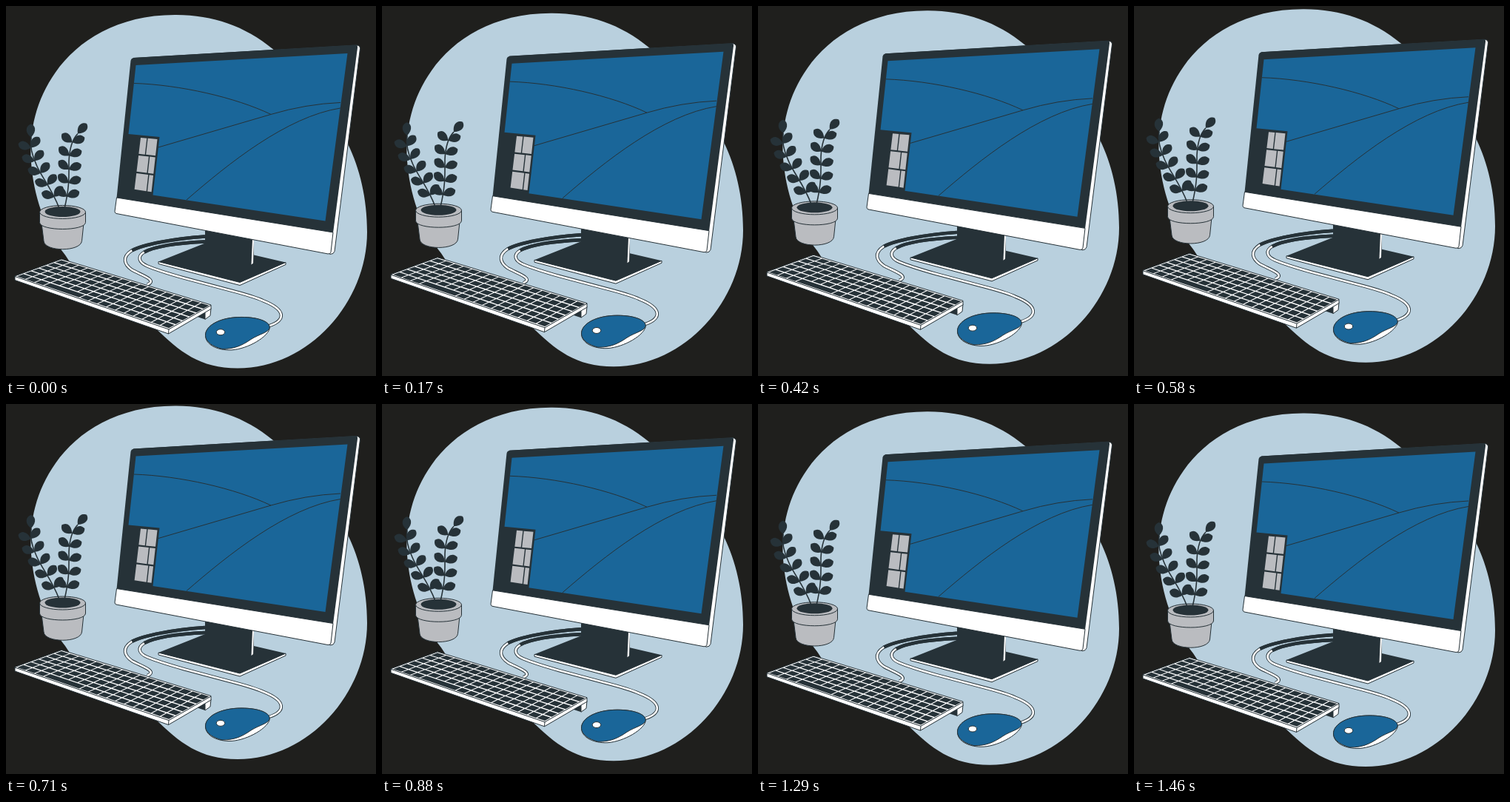
Recreate the animation shown at these times as an HTML page. Size 500 by 500 pixels, loop 1500 ms.

```html
<!DOCTYPE html>
<html lang="en">
<head>
<meta charset="utf-8">
<title>Floating desktop</title>
<style>
  html, body { margin: 0; width: 100%; height: 100%; overflow: hidden; background: #1f1f1d; }
  svg { display: block; width: 100vw; height: 100vh; }
  .blue { fill: #1a6699; }
  .dark { fill: #263238; }
  .gray { fill: #babcc0; }
  .white { fill: #fff; }
  .edge { stroke: #263238; stroke-linejoin: round; }
  .line { fill: none; stroke: #263238; }
  .case { fill: none; stroke: #263238; stroke-width: 4.4; }
  .wire { fill: none; stroke: #fff; stroke-width: 2.6; }
</style>
</head>
<body>
<svg viewBox="0 0 500 500">
  <defs>
    <path id="keyCable" d="M269 312C225 315 185 323 170 331C156 340 160 350 170 357C182 364 206 371 191 377"/>
    <path id="mouseCable" d="M269 319C225 321 200 326 187 333C177 339 179 347 191 352Q205 358 240 368L300 384Q335 393 348 399C378 411 379 425 355 433"/>
  </defs>
  <g id="scene">
    <path fill="#b9d0de" d="M230 12.500C152 12 97 47 67 90C41 127 31 168 34 212C37 255 52 302 80 337C115 395 165 405 201 435C235 468 262 490 313 490C410 490 488 400 488 306C488 260 478 220 462 187C440 145 395 90 361 59C322 27 280 13 230 12.500Z"/>

    <g id="cables">
      <use href="#keyCable" class="case"/>
      <use href="#keyCable" class="wire"/>
      <use href="#keyCable" class="case" stroke-dasharray="101 999"/>
      <use href="#mouseCable" class="case"/>
      <use href="#mouseCable" class="wire"/>
      <use href="#mouseCable" class="case" stroke-dasharray="84 999"/>
    </g>

    <g id="monitor">
      <path class="white edge" d="M206 346L316 374L378 347V350L316 378L206 349Z"/>
      <path class="dark" d="M206 346L269 321V300L335 312V337L378 347L316 374Z"/>
      <path class="white" d="M333 316L335 317L334 348L331.500 350Z"/>
      <path class="white edge" d="M172 71L474 53.500Q478.500 54 478.500 58L444 332Q443 336 438 336L430 330Z"/>
      <path class="dark" d="M173 70.500L472 53Q475.500 53 475 57L442 307L149.500 260L168.500 74.500Q169 71 173 70.500Z"/>
      <path class="white edge" d="M149.500 259.500L442 306.500L439 333Q438.500 336 435 335.500L149 281Q147 280.500 147 278Z"/>
      <path class="blue" d="M175.500 80.500L461.500 64.500L431.500 291L198.500 256L207.500 177.500L165.500 173.500Z"/>
      <path class="line" d="M173 105C235 107 310 124 358 147M206 191.500L358 147Q405 133 452 131M244 262.500C300 214 379 150 452 138.500"/>
      <path id="tiles" class="gray"/>
    </g>

    <g id="keyboard">
      <path class="white edge" d="M269 414L277 409L276 419L269 424Z"/>
      <path class="dark" d="M257 420L269 415V424Z"/>
      <path class="white edge" d="M12 365.500L75 342.500L277 404.500V410L219.500 443.500L12 371Z"/>
      <path id="keys" class="dark"/>
      <path class="line" d="M12 366L220 437.500L277 405M220 437.500L219.500 443.500"/>
    </g>

    <g id="mouse">
      <path class="white edge" d="M269.500 446C269 432 290 421 318 421C343 421 358 428 356 437C352 450 322 466 301 465.500C284 465 270 458 269.500 446Z"/>
      <path class="blue edge" d="M269.500 446C269 432 290 421 318 421C343 421 358 428 356 436C354 442 342 444 331 451C318 460 308 464 292 464C280 461 270 455 269.500 446Z"/>
      <ellipse class="white edge" cx="290" cy="441.300" rx="5.700" ry="4"/>
    </g>

    <g id="plant">
      <path class="gray edge" d="M48 294L51 318C52 333 101 333 102.500 318L105 294Z"/>
      <path class="gray edge" d="M45.500 279V293C46 305 107 305 107.500 293V279Z"/>
      <ellipse class="gray edge" cx="76.500" cy="279" rx="31" ry="9"/>
      <ellipse class="dark" cx="76.500" cy="278.500" rx="24" ry="7"/>
      <g stroke-width="1.600">
        <path id="leftStem" class="line" d="M72 274C62 247 48 232 41 215C35 202 32 190 34 178"/>
        <path id="rightStem" class="line" d="M79 274C86 245 85 230 85 210C86 190 90 180 97 173"/>
      </g>
      <g id="leaves" class="dark"></g>
    </g>
  </g>
</svg>
<script>
  const byId = id => document.getElementById(id);

  // Returns a function that outlines the cell u0..u1, v0..v1 of a four-cornered face
  const face = (a, b, c, d) => {
    const point = (u, v) => [0, 1].map(i =>
      ((1 - v) * ((1 - u) * a[i] + u * b[i]) + v * ((1 - u) * d[i] + u * c[i])).toFixed(2)).join(' ');
    return (u0, u1, v0, v1) =>
      `M${point(u0, v0)}L${point(u1, v0)}L${point(u1, v1)}L${point(u0, v1)}Z`;
  };

  // Menu tiles: three rows, each split in two
  const menuCell = face([182, 178.500], [204.500, 180.500], [196.500, 252.500], [173.500, 249]);
  byId('tiles').setAttribute('d', [0.400, 0.640, 0.730].map((split, row) => {
    const top = row * 0.340, bottom = top + 0.310;
    return menuCell(0, split - 0.030, top, bottom) + menuCell(split + 0.030, 1, top, bottom);
  }).join(''));

  // Keyboard: even grid with a long space bar in the front row
  const COLS = 17, ROWS = 6, SPACE_COL = 3, SPACE_SPAN = 4;
  const keyCell = face([75, 343.500], [276, 405], [220, 436.500], [13.500, 366]);
  let keys = '';
  for (let row = 0; row < ROWS; row++) {
    for (let col = 0, span; col < COLS; col += span) {
      span = row === ROWS - 1 && col === SPACE_COL ? SPACE_SPAN : 1;
      keys += keyCell((col + 0.060) / COLS, (col + span - 0.060) / COLS,
                      (row + 0.090) / ROWS, (row + 0.910) / ROWS);
    }
  }
  byId('keys').setAttribute('d', keys);

  // Each stem carries one leaf at its tip and five pairs below
  const leaf = ({ x, y }, angle) =>
    `<path transform="translate(${x} ${y})rotate(${angle})" d="M0 0C5-6 10-7 14-5C17-3 17.500-1 18 0C17 3 15 5 12 5.500C8 6 4 4 0 0Z"/>`;
  const foliage = (id, tipAngle, leftAngle, rightAngle) => {
    const stem = byId(id), length = stem.getTotalLength();
    let shapes = leaf(stem.getPointAtLength(length), tipAngle);
    for (let pair = 0; pair < 5; pair++) {
      const node = stem.getPointAtLength(length - 14 - 18.500 * pair);
      shapes += leaf(node, leftAngle) + leaf(node, rightAngle);
    }
    return shapes;
  };
  byId('leaves').innerHTML =
    foliage('leftStem', -92, -163, -51) + foliage('rightStem', -48, -141, -21);

  // The whole scene rises 10 px and sinks back at constant speed
  const LOOP = 1500, RISE = 10, LEAD = 40;
  const start = performance.now();
  function draw(now) {
    const phase = (Math.max(0, now - start) + LEAD) % LOOP / LOOP;
    const lift = RISE * (1 - Math.abs(2 * phase - 1));
    byId('scene').setAttribute('transform', `translate(0 ${-lift})`);
    requestAnimationFrame(draw);
  }
  draw(start);
</script>
</body>
</html>
```
